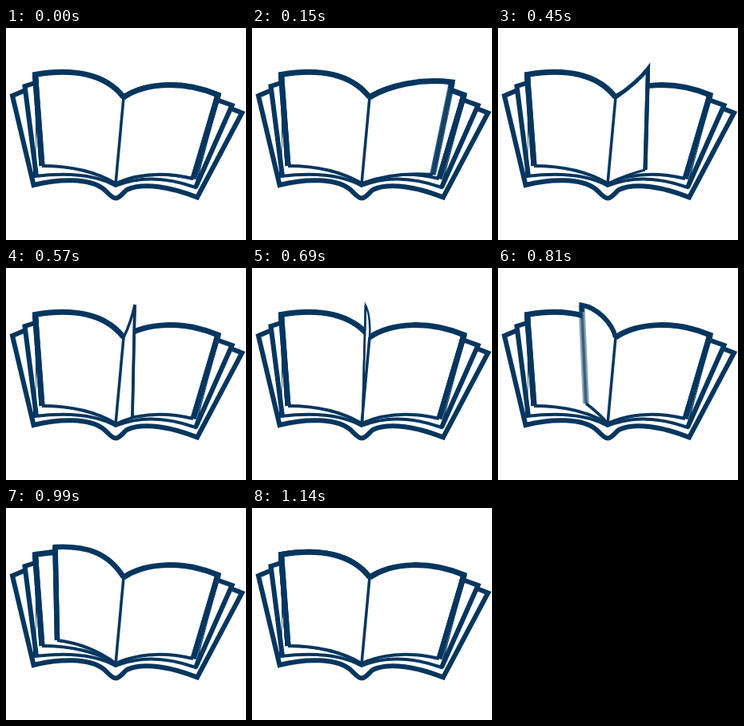
An HTML page that plays this animation: 300 by 266 pixels, repeating every 1.17 s.

```html
<!DOCTYPE html>
<html lang="en">
<head>
<meta charset="utf-8">
<title>Turning page</title>
<style>
  html, body { margin: 0; width: 100%; height: 100%; overflow: hidden; background: #fff; }
  svg { display: block; width: 100vw; height: 100vh; }
  path { fill: none; stroke: #05365f; stroke-miterlimit: 6; }
  .sheet { fill: #fff; stroke-width: 6; }
  .paper { fill: #fff; stroke: none; }
  .thin { stroke-width: 4; }
</style>
</head>
<body>
<svg viewBox="0 0 300 266">
  <path class="sheet" d="M22 79L8 85L34.500 197C66 189 104 188 122 202C128 207 132 213.500 137 213.500C142 213.500 146 207 151 203C172 193 207 200 239 212.500L295 106.500L281 101L147 90Z"/>
  <path class="sheet thin" d="M36 186Q102 178 137 198Q181 180 237 200L266 100L147 90L36 75Z"/>
  <path class="sheet" d="M36 69L23.500 73L38 186"/>
  <path class="sheet" d="M266 91L282.500 97L237 200"/>
  <g id="book"></g>
  <path d="M147 87L137 196" stroke-width="3.500"/>
</svg>
<script>
  const LOOP = 1170, STEP = 30;

  // time, top curve (two controls, corner), foot, bottom control, weight, softness
  const KEYS = [
    [0, 175, 68, 222, 66, 265, 84, 234, 189, 180, 176, 7, 0],
    [150, 171, 72, 211, 63, 250, 68, 226, 184, 177, 180, 7, 0.5],
    [300, 165, 77, 195, 66, 222.8, 55.5, 209, 178, 170, 184, 6.5, 1],
    [450, 160, 78, 176, 66, 187.5, 51, 184, 178, 163, 183, 5, 0],
    [570, 153, 75, 158, 60, 161, 46, 158, 187, 148, 190, 3.5, 0],
    [690, 148, 75, 147, 56, 142, 47, 138, 193, 138, 194, 2.5, 0],
    [810, 143, 70, 125, 50, 104.5, 46.5, 110, 170, 126, 182, 6, 1],
    [990, 128, 56, 100, 47, 61.5, 49, 64, 166, 105, 171, 6.5, 0],
    [1140, 125, 58, 85, 50, 36.5, 58.5, 45, 173, 100, 173, 7, 0]
  ];

  const book = document.getElementById('book');

  function addPath(name) {
    const el = document.createElementNS('http://www.w3.org/2000/svg', 'path');
    el.setAttribute('class', name);
    return book.appendChild(el);
  }

  function makePage() {
    const paper = addPath('paper'), bottom = addPath('thin');
    const halo = addPath(''), core = addPath(''), rim = addPath('');
    const set = (el, d, width) => {
      el.setAttribute('d', d);
      if (width) el.setAttribute('stroke-width', width);
    };
    return ([, ax, ay, bx, by, x, y, fx, fy, qx, qy, weight, softness]) => {
      const soft = Math.max(0, Math.min(1, softness));
      const top = `M147 87C${ax} ${ay} ${bx} ${by} ${x} ${y}`;
      const base = `Q${qx} ${qy} 137 195`;
      const side = `M${x} ${y}L${fx} ${fy}`;
      set(paper, `${top}L${fx} ${fy}${base}Z`);
      set(bottom, `M${fx} ${fy}${base}`);
      bottom.style.strokeWidth = Math.min(4, weight * 0.6);
      set(halo, side, weight + 2 * soft);
      halo.style.opacity = 1 - 0.55 * soft;
      set(core, side, weight * (1 - 0.4 * soft));
      core.style.opacity = 1 - 0.4 * soft;
      // a short stub of the side keeps the corner sharp
      set(rim, `${top}L${x + (fx - x) * 0.07} ${y + (fy - y) * 0.07}`, weight);
    };
  }

  function slope(i, c) {
    const a = KEYS[Math.max(0, i - 1)], b = KEYS[Math.min(KEYS.length - 1, i + 1)];
    return (b[c] - a[c]) / (b[0] - a[0]);
  }

  function pose(t) {
    let i = 0;
    while (i < KEYS.length - 2 && t >= KEYS[i + 1][0]) i++;
    const a = KEYS[i], b = KEYS[i + 1], span = b[0] - a[0];
    const u = Math.min(1, (t - a[0]) / span), v = 1 - u;
    return a.map((p, c) =>
      v * v * (1 + 2 * u) * p + u * u * (3 - 2 * u) * b[c] +
      span * u * v * (v * slope(i, c) - u * slope(i + 1, c)));
  }

  makePage()(KEYS[0]);
  makePage()(KEYS[KEYS.length - 1]);
  const turn = makePage();

  function draw() {
    const t = performance.now() % LOOP;
    turn(pose(Math.floor(t / STEP) * STEP));
    requestAnimationFrame(draw);
  }
  draw();
</script>
</body>
</html>
```
